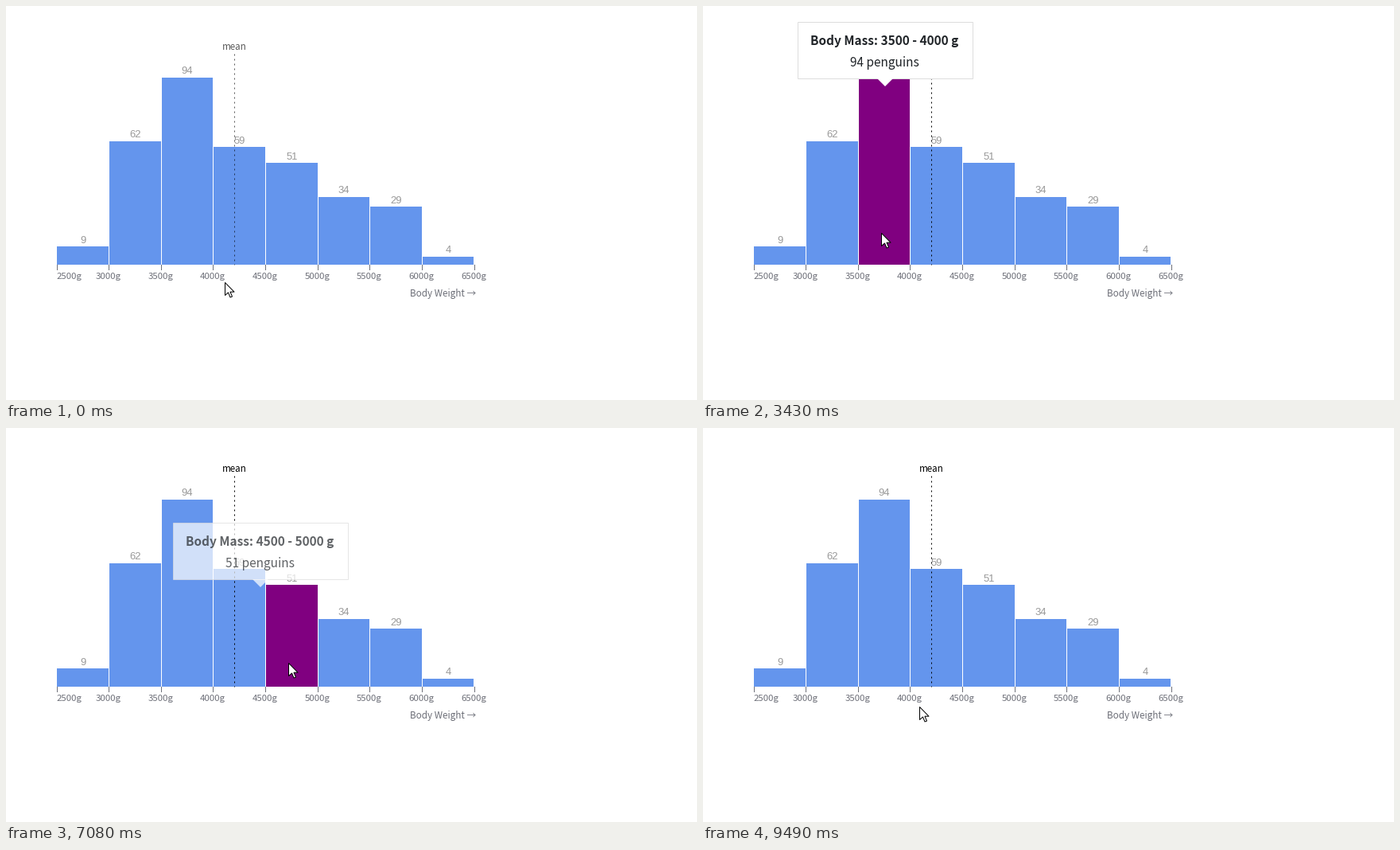
Animation of 869 by 495 pixels, one loop 9690 ms. Source, as a matplotlib script:

```python
import math

import matplotlib.pyplot as plt
import numpy as np
from matplotlib.animation import FuncAnimation
from matplotlib.patches import Polygon, Rectangle

W, H, DPI = 869, 495, 100
LOOP, INTERVAL = 9690, 30
COUNTS = [9, 62, 94, 59, 51, 34, 29, 4]
LEFT, PITCH, BASE, UNIT = 64, 65.625, 325, 2.5
BLUE, PURPLE, GREY = "#6495ed", "#800080", "#6e7079"
UI, NUM = "Noto Sans CJK JP", "Liberation Sans"

REFRESH = 100  # ms between screen updates while something moves
SETTLE = 200   # ms of updates after the pointer stops
LAG = 40       # ms until the chart notices the pointer
FADE = 250     # ms of a tooltip transition
INK_TIME = 2970  # the mean marker turns black here

# Pointer moves: begin, end, x, y
HOME = (275, 347)
MOVES = [(1510, 1850, 295, 307), (2530, 3230, 224, 285),
         (4650, 4850, 164, 293), (5770, 6070, 205, 389),
         (6570, 7080, 358, 293), (7880, 8180, 325, 291),
         (8180, 8680, 284, 321), (8880, 9290, 272, 350)]

ARROW = np.array([(0, 0), (0, 16), (4, 12.5), (6.5, 18.5), (9, 17.5),
                  (6.5, 11.7), (11.5, 11.7)])
TIP_W, TIP_H = 220, 71
NOTCH = np.array([(100.5, TIP_H - 0.5), (110.5, TIP_H + 9.5),
                  (120.5, TIP_H - 0.5)])


def pt(px):
    return px * 72 / DPI


def bar_top(i):
    return BASE - UNIT * COUNTS[i]


def bar_mid(i):
    return LEFT + PITCH * (i + 0.5)


def pointer_at(t):
    x, y = HOME
    for begin, end, to_x, to_y in MOVES:
        u = min(max((t - begin) / (end - begin), 0), 1)
        x, y = x + (to_x - x) * u, y + (to_y - y) * u
    return np.array([x, y])


def bar_under(x, y):
    i = int((x - LEFT) // PITCH)
    inside = 0 <= i < len(COUNTS) and bar_top(i) < y < BASE
    return i if inside else None


def hover_changes():
    changes, last = [], None
    for t in range(0, LOOP, 5):
        bar = bar_under(*pointer_at(t - LAG))
        if bar != last:
            changes.append((t, bar))
            last = bar
    return changes


HOVERS = hover_changes()


def screen_time(now):
    """Time of the latest screen update."""
    t = 0
    for begin, end, *_ in MOVES:
        if now >= begin + REFRESH:
            steps = (now - begin) // REFRESH
            t = min(begin + steps * REFRESH, end + SETTLE)
    return t


def anchor(i):
    """Top left corner of the tooltip that belongs to a bar."""
    return np.array([bar_mid(i) - 109.5, bar_top(i) - 70])


def tween(t, start, a, b):
    u = min(max((t - start) / FADE, 0), 1)
    return a + (b - a) * (1 - (1 - u) ** 2)


def tip_at(t):
    hovered, label = None, 0
    move, fade = (0, anchor(0), anchor(0)), (0, 0, 0)
    for start, bar in HOVERS:
        if start > t:
            break
        if bar is None:
            fade = (start, 1, 0)
        else:
            goal, label = anchor(bar), bar
            if hovered is None:
                move, fade = (start, goal + (0, 10), goal), (start, 0, 1)
            else:
                move = (start, tween(start, *move), goal)
        hovered = bar
    return hovered, label, tween(t, *move), tween(t, *fade)


fig = plt.figure(figsize=((W + 1e-6) / DPI, (H + 1e-6) / DPI), dpi=DPI,
                 facecolor="white")
ax = fig.add_axes([0, 0, 1, 1])
ax.set(xlim=(0, W), ylim=(H, 0))
ax.axis("off")


def write(x, y, text, size, color, font=UI, ha="center", **kw):
    return ax.text(x, y, text, size=pt(size), color=color, family=font,
                   ha=ha, va="baseline", **kw)


bars = []
for i, count in enumerate(COUNTS):
    x0 = math.ceil(LEFT + PITCH * i)
    x1 = math.ceil(LEFT + PITCH * (i + 1)) - 1
    bar = Rectangle((x0, bar_top(i)), x1 - x0, BASE - bar_top(i), lw=0, fc=BLUE)
    bars.append(ax.add_patch(bar))
    write(bar_mid(i), bar_top(i) - 5, str(count), 13, "#999999", NUM, zorder=2)

for i in range(len(COUNTS) + 1):
    x = LEFT + PITCH * i
    ax.plot([int(x)] * 2, [BASE, BASE + 6], color=GREY, lw=pt(1))
    write(x - 0.8, 343, f"{2500 + 500 * i}g", 11.4, GREY,
          ha="center" if i else "left")
write(591, 365, "Body Weight →", 11.7, GREY, ha="right")

mean_text = write(287, 55, "mean", 11.6, "black")
mean_line, = ax.plot([287] * 2, [60, BASE], lw=pt(1), color="black", zorder=3,
                     dashes=(2, 4), dash_capstyle="butt")

bubble = ax.add_patch(Rectangle((0, 0), TIP_W, TIP_H, fc="white", ec="#dddddd",
                                lw=pt(1), zorder=5))
notch = ax.add_patch(Polygon(NOTCH, fc="white", lw=0, zorder=5))
title = write(0, 0, "", 15.4, "#212529", weight="bold", zorder=6)
detail = write(0, 0, "", 15.4, "#212529", zorder=6)
pointer = ax.add_patch(Polygon(ARROW, fc="white", ec="black", lw=pt(1),
                               joinstyle="round", zorder=8))


def draw(k):
    t = screen_time(k * INTERVAL + 20)
    hovered, label, pos, alpha = tip_at(t)

    for i, bar in enumerate(bars):
        bar.set_facecolor(PURPLE if i == hovered else BLUE)
    for part in (mean_line, mean_text):
        part.set_alpha(0.65 if t < INK_TIME else 1)

    x, y = math.floor(pos[0]), math.floor(pos[1] + 0.5)
    bubble.set_xy((x + 0.5, y + 0.5))
    notch.set_xy(NOTCH + (x + 0.5, y + 0.5))
    low = 2500 + 500 * label
    title.set_text(f"Body Mass: {low} - {low + 500} g")
    detail.set_text(f"{COUNTS[label]} penguins")
    title.set_position((x + 110.5, y + 29))
    detail.set_position((x + 110.5, y + 56))
    for part in (bubble, notch, title, detail):
        part.set_alpha(alpha)
        part.set_visible(alpha > 0)

    pointer.set_xy(ARROW + np.round(pointer_at(t)) + 0.5)
    return []


anim = FuncAnimation(fig, draw, frames=LOOP // INTERVAL, interval=INTERVAL,
                     init_func=lambda: [], repeat=True, repeat_delay=0)
plt.show()
```
